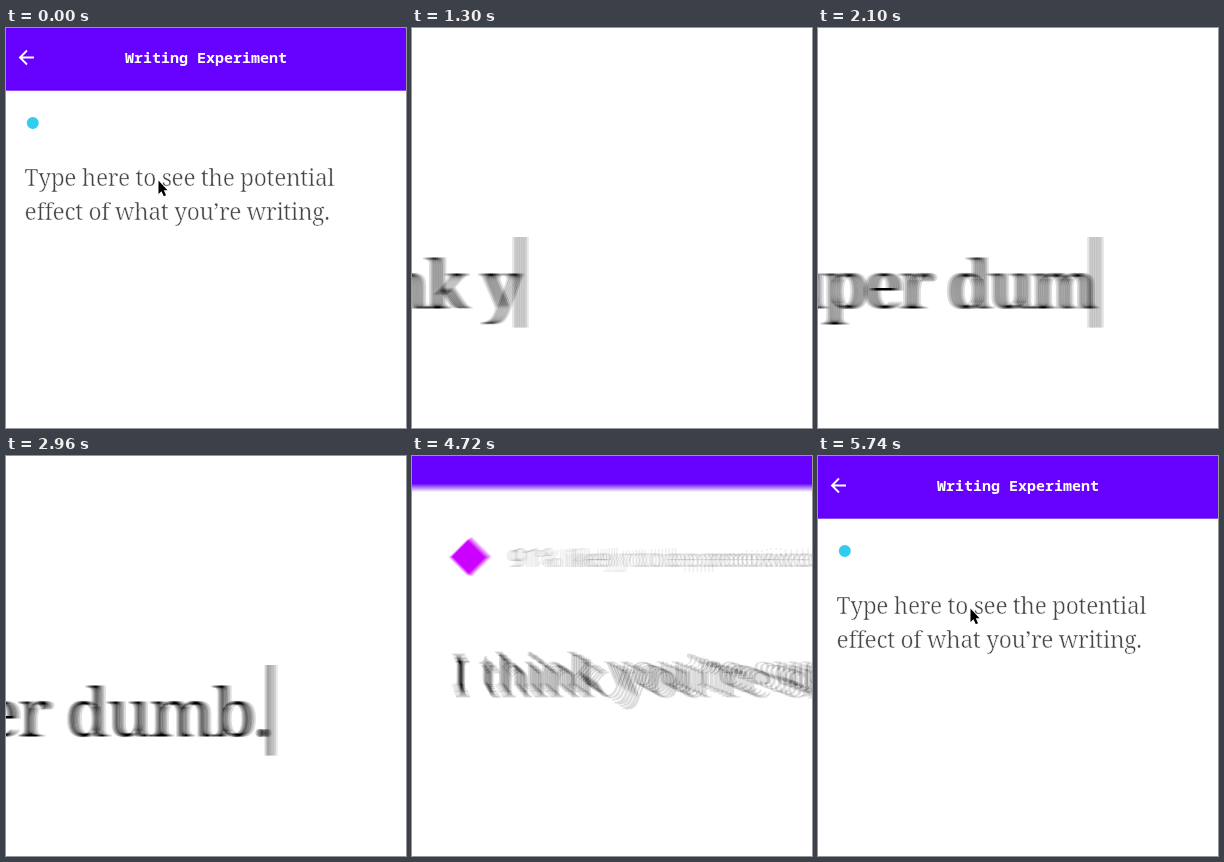
Recreate the animation shown at these times as an HTML page with a canvas. Size 400x400 px, loop 5.78 s.

```html
<!DOCTYPE html>
<html lang="en">
<head>
<meta charset="utf-8">
<title>Writing Experiment</title>
<style>
  html, body { margin: 0; height: 100%; overflow: hidden; background: #fff; }
  canvas { display: block; width: 100vw; height: 100vh; }
</style>
</head>
<body>
<canvas id="stage" width="400" height="400"></canvas>
<script>
const screen2d = document.getElementById('stage').getContext('2d');
const layer = document.createElement('canvas');
layer.width = layer.height = 400;
const ctx = layer.getContext('2d');

const LOOP = 5780, ZOOM = 3, LEFT = 18.6, BASE = 158;
const SHUTTER = 28, SAMPLES = 8;
const MESSAGE = 'I think you’re super dumb.';
const SERIF = '300 22.7px "Noto Serif", serif', SPACING = -.3;
const BLUE = [51, 204, 238], PALE = [153, 204, 255], PURPLE = [204, 0, 255];

const span = (t, a, b) => Math.min(1, Math.max(0, (t - a) / (b - a)));
const sine = u => (1 - Math.cos(Math.PI * u)) / 2;
const smooth = u => u * u * (3 - 2 * u);
const quart = u => u < .5 ? 8 * u ** 4 : 1 - 8 * (1 - u) ** 4;
const mix = (a, b, k) => a.map((v, i) => v + (b[i] - v) * k);

function setFont(font, spacing) {
  ctx.font = font;
  ctx.letterSpacing = spacing + 'px';
}

function text(str, x, y, font, color, spacing = 0, align = 'left') {
  setFont(font, spacing);
  ctx.fillStyle = color;
  ctx.textAlign = align;
  ctx.fillText(str, x, y);
}

// Serif text with its edges trimmed in white, for a lighter weight
function lightSerif(str, y, color, trim) {
  text(str, LEFT, y, SERIF, color, SPACING);
  ctx.strokeStyle = '#fff';
  ctx.lineWidth = trim;
  ctx.lineJoin = 'round';
  ctx.strokeText(str, LEFT, y);
}

function caretX(count) {
  setFont(SERIF, SPACING);
  ctx.textAlign = 'left';
  return LEFT + ctx.measureText(MESSAGE.slice(0, count)).width;
}

const typedCount = t => Math.min(MESSAGE.length, Math.max(0, Math.floor((t - 826) / 52)));

// Sideways camera travel in screen pixels: follow the typing, then return
function pan(t) {
  const mid = ZOOM * caretX(16) - 161, end = ZOOM * caretX(MESSAGE.length) - 259;
  const out = 105 * span(t, 936, 1060)
    + (mid - 105) * span(t, 1060, 1660)
    + (end - mid) * span(t, 1660, 2270);
  return out * (1 - sine(span(t, 2930, 3480)));
}

const zoomed = t => sine(span(t, 480, 880)) - quart(span(t, 4260, 5220));

function header() {
  ctx.fillStyle = '#6600ff';
  ctx.fillRect(0, 0, 400, 62.7);
  text('Writing Experiment', 119, 34.5, '600 15px "Noto Sans Mono", monospace', '#fff');
  ctx.strokeStyle = '#fff';
  ctx.lineWidth = 1.9;
  ctx.lineJoin = 'miter';
  ctx.stroke(new Path2D('M28 29.5H14.5M21 22.5L14 29.5L21 36.5'));
}

function badge(t) {
  const reset = t >= 5660;
  const morph = reset ? 0 : smooth(span(t, 3250, 3500));
  const size = 12 + morph * .5;
  const color = reset ? BLUE : mix(mix(BLUE, PALE, span(t, 600, 900)), PURPLE, morph);
  ctx.save();
  ctx.translate(26.8, 95);
  ctx.rotate((-135 + 180 * smooth(span(t, 3620, 4140))) * Math.PI / 180);
  ctx.beginPath();
  ctx.roundRect(-size / 2, -size / 2, size, size, 6 * (1 - morph));
  ctx.fillStyle = `rgb(${color})`;
  ctx.fill();
  ctx.restore();
}

function placeholder() {
  lightSerif('Type here to see the potential', 158, '#444', .5);
  lightSerif('effect of what you’re writing.', 192, '#444', .5);
}

function pointer() {
  const path = new Path2D('M152.5 152.5V166L155.5 163.2L157.8 168.3L160 167.3L157.8 162.3H161.5Z');
  ctx.strokeStyle = '#fff';
  ctx.lineWidth = 1.2;
  ctx.stroke(path);
  ctx.fillStyle = '#000';
  ctx.fill(path);
}

function status() {
  const font = '300 11.5px Roboto, sans-serif', color = '#8c8c8c';
  text('91% likely to be perceived as “toxic.”', 45.7, 99.5, font, color, .43);
  text('SEEM WRONG?', 374, 99.5, font, color, .43, 'right');
}

// The scene at time t, seen by the camera as it stands at time view
function drawScene(t, view) {
  const z = zoomed(view), scale = 1 + (ZOOM - 1) * z;
  const fade = span(t, 5550, 5740);
  const count = typedCount(t);

  ctx.setTransform(1, 0, 0, 1, 0, 0);
  ctx.globalAlpha = 1;
  ctx.fillStyle = '#fff';
  ctx.fillRect(0, 0, 400, 400);
  ctx.setTransform(scale, 0, 0, scale, -pan(view), -193 * z + 8 * Math.sin(Math.PI * z));

  ctx.globalAlpha = count ? fade : 1;
  placeholder();
  if (t < 700 || fade) pointer();

  ctx.globalAlpha = 1 - fade;
  lightSerif(MESSAGE.slice(0, count), BASE, '#000', .4);
  if (t > 700 && t < 3480) {
    ctx.fillStyle = '#555';
    ctx.fillRect(caretX(count) - .75, 134, 1.5, 30.2);
  }
  ctx.globalAlpha = span(t, 3300, 3520) * (1 - fade);
  status();

  ctx.globalAlpha = 1;
  header();
  badge(t);
}

// Average several camera positions for motion blur
function draw(t) {
  for (let i = 0; i < SAMPLES; i++) {
    drawScene(t, t + SHUTTER * (i / (SAMPLES - 1) - .5));
    screen2d.globalAlpha = 1 / (i + 1);
    screen2d.drawImage(layer, 0, 0);
  }
}

const start = performance.now();
function tick() {
  draw((performance.now() - start) % LOOP);
  requestAnimationFrame(tick);
}
tick();
</script>
</body>
</html>
```
